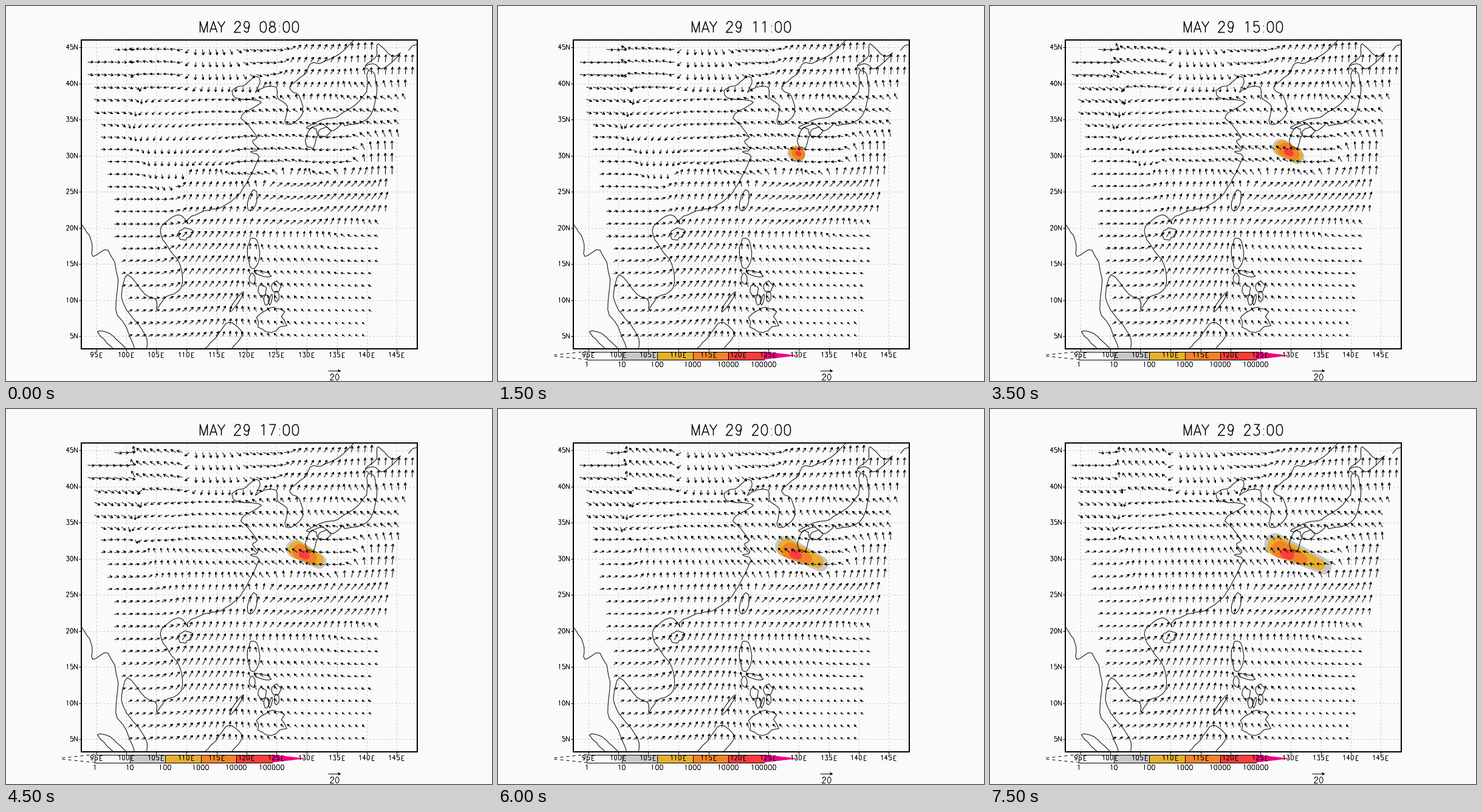
A matplotlib script that plays this animation: 800x618 px, repeating every 8 s.

```python
import numpy as np
import matplotlib.pyplot as plt
from matplotlib.animation import FuncAnimation
from matplotlib.collections import LineCollection
from matplotlib.patches import Polygon, Rectangle

W, H, DPI = 800, 618, 100
FRAMES, STEP = 16, 500
PLUME_START = 3
BG = "#fafafa"
SHADES = ["#c8c8c8", "#e6af2d", "#f08228", "#fa3c3c"]
PX = 72 / DPI

fig = plt.figure(figsize=(W / DPI, H / DPI), dpi=DPI, facecolor=BG)
ax = fig.add_axes([0, 0, 1, 1])
ax.set_xlim(-0.5, W - 0.5)
ax.set_ylim(H - 0.5, -0.5)
ax.axis("off")
rng = np.random.default_rng(29)


def strokes(segs, width=1.0, color="black", z=5, **kw):
    lines = LineCollection(segs, colors=color, linewidths=width * PX, zorder=z, **kw)
    ax.add_collection(lines)
    return lines


# --- single-stroke lettering, 21 units tall ---

def arc(cx, cy, rx, ry, a0=0, a1=360):
    a = np.radians(np.linspace(a0, a1, 20))
    return list(zip(cx + rx * np.cos(a), cy + ry * np.sin(a)))


six = [(16, 18), (11, 21), (7, 19.5), (4, 8)] + arc(10, 6.5, 6, 6.5, 180, 540)
GLYPHS = {
    "0": (20, [arc(10, 10.5, 7, 10.5)]),
    "1": (20, [[(6, 17), (11, 21), (11, 0)]]),
    "2": (20, [arc(10, 15.5, 6, 5.5, 180, -35) + [(3, 0), (17, 0)]]),
    "3": (20, [[(5, 21), (16, 21), (10, 13)] + arc(10, 6.5, 7, 6.5, 80, -150)]),
    "4": (20, [[(13, 0), (13, 21), (3, 7), (18, 7)]]),
    "5": (20, [[(15, 21), (5, 21), (4, 12)] + arc(10, 7, 7, 7, 120, -150)]),
    "6": (20, [six]),
    "7": (20, [[(3, 21), (17, 21), (7, 0)]]),
    "8": (20, [arc(10, 16.2, 5.5, 4.8), arc(10, 5.7, 7, 5.7)]),
    "9": (20, [[(20 - x, 21 - y) for x, y in six]]),
    "M": (24, [[(4, 0), (4, 21), (12, 0), (20, 21), (20, 0)]]),
    "A": (18, [[(1, 0), (9, 21), (17, 0)], [(4, 7), (14, 7)]]),
    "Y": (18, [[(1, 21), (9, 11), (9, 0)], [(17, 21), (9, 11)]]),
    "N": (22, [[(4, 0), (4, 21), (18, 0), (18, 21)]]),
    "E": (19, [[(17, 21), (4, 21), (4, 0), (17, 0)], [(4, 11), (12, 11)]]),
    ":": (10, [[(4, 1), (6, 1)], [(4, 13), (6, 13)]]),
    " ": (16, []),
}


def lettering(text, x, y, height, align=0.5):
    """Strokes of text, vertically centred on y; align 0.5 centres, 1 is right."""
    sy = height / 21
    sx = 0.88 * sy
    segs, pen = [], 0
    for ch in text:
        width, parts = GLYPHS[ch]
        for part in parts:
            p = np.array(part, float)
            segs.append(np.c_[(p[:, 0] + pen) * sx, y + height / 2 - p[:, 1] * sy])
        pen += width
    xs = np.concatenate(segs)[:, 0]
    shift = x - xs.min() - align * (xs.max() - xs.min())
    return [np.round(s + (shift, 0)) for s in segs]


# --- frame, grid and axis labels ---

def lon_x(lon):
    return round(147.5 + (lon - 95) * 9.9)


def lat_y(lat):
    return round(543 - (lat - 5) * 11.89)


L, R, T, B = 123, 676, 55, 564
lons, lats = range(95, 150, 5), range(5, 50, 5)
grid = [[(lon_x(v), T), (lon_x(v), B)] for v in lons]
grid += [[(L, lat_y(v)), (R, lat_y(v))] for v in lats]
strokes(grid, 1, "#b8b8b8", z=1, linestyles=[(0, (2, 4))])
ticks = [[(lon_x(v), B), (lon_x(v), B + 4)] for v in lons]
ticks += [[(L - 4, lat_y(v)), (L, lat_y(v))] for v in lats]
strokes(ticks)
ax.add_patch(Rectangle((L, T), R - L, B - T, fill=False, lw=2 * PX,
                       ec="black", zorder=8))

labels = []
for v in lons:
    labels += lettering(f"{v}E", lon_x(v), 574, 8)
for v in lats:
    labels += lettering(f"{v}N", 117, lat_y(v), 8, 1)
labels += lettering("20", 540.5, 611, 10)
strokes(labels, z=9)

# --- coastlines: curves through a few headlands and bays ---

def coast(*pts):
    p = np.array(pts, float)
    p = np.vstack([2 * p[0] - p[1], p, 2 * p[-1] - p[-2]])
    s = np.linspace(0, 1, 5)[:-1, None]
    out = []
    for a, b, c, d in zip(p, p[1:], p[2:], p[3:]):
        out.append(b + 0.5 * s * (c - a + s * (2 * a - 5 * b + 4 * c - d
                                               + s * (3 * b - a - 3 * c + d))))
    line = np.vstack(out + [p[-2:-1]])
    line[1:-1] += rng.normal(0, 0.5, line[1:-1].shape)
    strokes([line], z=4)


def island(cx, cy, rx, ry, tilt=0, rough=0.09):
    a = np.linspace(0, 2 * np.pi, 19)
    r = 1 + rng.normal(0, rough, a.size)
    r[-1] = r[0]
    z = (rx * np.cos(a) + 1j * ry * np.sin(a)) * r * np.exp(1j * np.radians(tilt))
    strokes([np.c_[cx + z.real, cy + z.imag]], z=4)


# Korea and the coast to its north-east
coast((573, 55), (549, 78), (518, 94), (503, 93), (490, 113), (466, 133),
      (482, 148), (488, 170), (480, 187), (460, 194), (462, 165), (447, 150),
      (444, 134), (425, 133), (410, 142))
# Bohai Sea to Hong Kong
coast((410, 142), (418, 122), (408, 116), (396, 127), (372, 139), (380, 152),
      (405, 154), (420, 158), (397, 172), (387, 184), (402, 200), (413, 216),
      (405, 222), (414, 236), (402, 240), (415, 248), (402, 278), (384, 309),
      (354, 331), (326, 337))
# Tonkin and Mekong to the Malay peninsula
coast((326, 337), (300, 350), (298, 358), (290, 346), (274, 347), (253, 370),
      (268, 400), (285, 424), (288, 464), (262, 480), (248, 499), (246, 484),
      (228, 474), (200, 443), (190, 478), (203, 507), (230, 543), (231, 564))
coast((123, 358), (140, 385), (142, 412), (168, 402), (184, 450), (180, 500),
      (197, 528), (211, 564))
# Sumatra and Borneo
coast((197, 564), (170, 539), (151, 535), (156, 545), (176, 564))
coast((327, 564), (346, 545), (366, 520), (388, 540), (371, 564))
# Honshu and Hokkaido
coast((499, 203), (495, 199), (520, 187), (546, 181), (580, 157), (594, 135),
      (594, 108), (606, 112), (609, 148), (594, 186), (560, 196), (553, 193),
      (538, 205), (518, 194), (499, 203))
coast((597, 105), (591, 98), (609, 82), (612, 62), (635, 82), (648, 78),
      (622, 103), (604, 95), (592, 98))
coast((662, 73), (668, 66), (676, 63))

island(294, 375, 13, 9, -20)             # Hainan
island(405, 320, 7, 18, 12, 0.03)        # Taiwan
island(502, 217, 9, 17, 12)              # Kyushu
island(524, 207, 10, 7, -20)             # Shikoku
island(407, 406, 10, 26)                 # Luzon
island(422, 441, 14, 4, 15)
island(405, 449, 5, 9)                   # Mindoro and the Visayas
island(421, 468, 7, 9)
island(428, 484, 4, 9)
island(435, 484, 2, 9, 15)
island(444, 462, 7, 9)
island(445, 478, 4, 8)
island(438, 515, 23, 19, -30, 0.14)      # Mindanao
island(379, 487, 3, 20, 35, 0.03)        # Palawan

# --- wind: key winds blended over a regular mesh ---

# x, y, length, heading at the start and at the end
KEY_WINDS = np.array([
    (160, 80, 9, -5, -10), (250, 95, 9, 170, 130), (350, 100, 9, -80, -70),
    (410, 72, 10, -15, -25), (500, 110, 9, 60, 55), (640, 100, 12, 82, 82),
    (180, 150, 8, -20, -40), (250, 185, 7, 215, 200), (350, 180, 7, 175, 150),
    (450, 195, 8, 145, 130), (610, 175, 9, 150, 140), (190, 260, 7, 0, 15),
    (260, 245, 7, -95, 90), (340, 240, 8, 225, 105), (430, 236, 11, 172, 130),
    (540, 240, 8, 190, 170), (630, 250, 14, 88, 75), (330, 300, 9, 65, 82),
    (470, 320, 11, 28, 43), (565, 310, 13, 42, 50), (220, 350, 7, 0, 22),
    (320, 420, 12, 52, 65), (470, 440, 7, 130, 130), (590, 410, 6, 160, 160),
    (210, 470, 7, 22, 28), (540, 510, 5, 145, 140)]).T


def row_span(r):
    if r == 0:
        return 4, 42
    right = min((r + 1) // 3, (r + 6) // 4) - (r == 2)
    return min(r // 3, 1 + r // 4), 48 - right


cells = []
for r in range(24):
    lo, hi = row_span(r)
    cells += [(r, c) for c in range(lo, hi + 1)]
ROW, COL = np.array(cells).T
TAIL = (134 + 11.125 * COL) + 1j * (71 + 20.57 * ROW)

kx, ky, klen, khead0, khead1 = KEY_WINDS
gap = np.abs(TAIL[:, None] - (kx + 1j * ky))
BLEND = (gap ** 2 + 25 ** 2) ** -2.0
BLEND /= BLEND.sum(axis=1, keepdims=True)
LENGTH = BLEND @ klen
DIR0, DIR1 = (BLEND @ np.exp(-1j * np.radians(h)) for h in (khead0, khead1))
# a burst over the north-west that peaks mid-way
BURST = 4 * np.exp(-((COL - 4) / 6) ** 2 - ((ROW - 2) / 3) ** 2)


def arrow_segments(tail, vec):
    size = np.abs(vec)
    tip = tail + vec
    barb = vec / size * np.minimum(4, 0.5 * size)
    turn = np.exp(1j * np.radians(28))
    z = np.array([tail, tip, tip - barb * turn, tip, tip - barb / turn]).T
    return np.round(np.stack([z.real, z.imag], axis=-1))


def wind(t):
    d = DIR0 * (1 - t) + DIR1 * t
    d = d / (np.abs(d) + 1e-6)
    return arrow_segments(TAIL, d * (LENGTH + BURST * np.sin(np.pi * t)))


arrows = strokes([], z=6)
strokes(arrow_segments(np.array([530 + 601j]), np.array([20 + 0j])))

# --- plume: each shade is the hull of two discs (x, y, radius) that drift apart ---

PLUME = [
    ([(487, 242, 11), (494, 246, 11)], [(469, 222, 18), (549, 259, 13)]),
    ([(489, 241, 11), (494, 243, 11)], [(472, 226, 16), (542, 256, 9)]),
    ([(493, 241, 10), (495, 244, 10)], [(477, 231, 14), (514, 247, 8)]),
    ([(493, 242, 4), (495, 243, 4)], [(485, 237, 8), (493, 241, 7)]),
]


def hull(d):
    a = np.linspace(0, 2 * np.pi, 72, endpoint=False)
    n = np.c_[np.cos(a), np.sin(a)]
    best = np.argmax(n @ d[:, :2].T + d[:, 2], axis=1)
    return d[best, :2] + n * d[best, 2:]


def blob(first, last, u):
    """The upwind disc sets off quickly, the downwind one slowly."""
    ease = np.array([[u ** 0.7], [u ** 1.4]])
    first, last = np.array(first, float), np.array(last, float)
    return hull(first + (last - first) * ease)


plume = [ax.add_patch(Polygon([(0, 0)] * 3, fc=c, ec="none", zorder=2))
         for c in SHADES]

# --- colour bar ---

X0, X1, TOP, LOW, CELL = 145, 437, 569, 582, 58.4
MID = (TOP + LOW) / 2
bar = []
for i, c in enumerate([BG] + SHADES):
    bar.append(ax.add_patch(Rectangle((X0 + i * CELL, TOP), CELL, LOW - TOP, fc=c,
                                      ec="black", lw=PX, zorder=3)))
bar.append(ax.add_patch(Polygon([(X1, TOP), (494, MID), (X1, LOW)],
                                fc="#f00082", ec="none", zorder=3)))
bar.append(strokes([[(92, MID - 1), (X0, TOP)], [(92, MID + 1), (X0, LOW)]],
                   linestyles=[(0, (5, 5))]))
marks = []
for i in range(6):
    marks += lettering(str(10 ** i), X0 + i * CELL, 590, 8.5)
bar.append(strokes(marks))

title = strokes([], 1.5, z=9)


def update(k):
    title.set_segments(lettering(f"MAY 29 {8 + k:02d}:00", 400, 34, 18))
    arrows.set_segments(wind(k / (FRAMES - 1)))
    shown = k >= PLUME_START
    u = max(0, k - PLUME_START) / (FRAMES - 1 - PLUME_START)
    for patch, (first, last) in zip(plume, PLUME):
        patch.set_xy(blob(first, last, u))
    for part in plume + bar:
        part.set_visible(shown)
    return []


anim = FuncAnimation(fig, update, frames=FRAMES, interval=STEP, repeat=True,
                     repeat_delay=0, blit=False)
plt.show()
```
